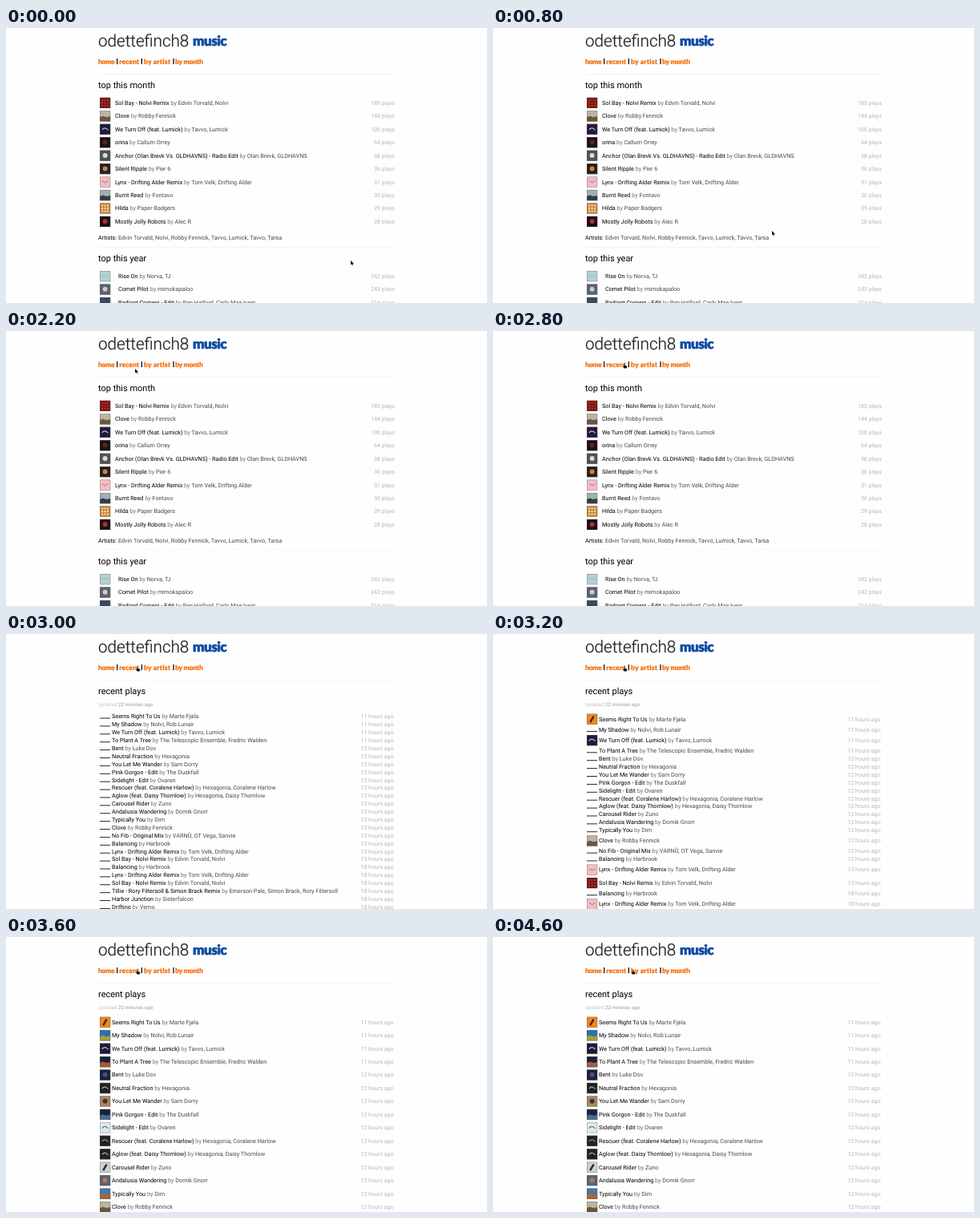
These frames come from a looping animation (600 px wide and 343 px high, 5 s). An HTML page:

```html
<!DOCTYPE html>
<html lang="en">
<head>
<meta charset="utf-8">
<title>music</title>
<style>
html, body { margin: 0; width: 100%; height: 100%; overflow: hidden; background: #fefefe; }
svg { display: block; width: 600px; height: 343px; }
text { font-family: Roboto, "Open Sans", sans-serif; font-size: 7.25px; fill: #000; white-space: pre; text-rendering: geometricPrecision; }
.name { font-size: 20.6px; font-weight: 300; fill: #222; stroke: #222; stroke-width: .25px; }
.logo, .nav { font-family: Lato, "Open Sans", sans-serif; font-weight: 900; }
.logo { font-size: 17px; letter-spacing: -.5px; fill: #0b4aa2; stroke: #0b4aa2; stroke-width: .6px; }
.nav { font-size: 8.5px; fill: #f5700c; stroke: #f5700c; stroke-width: .2px; }
.head { font-size: 11px; }
.by { fill: #707070; }
.who { fill: #484848; }
.side { font-size: 7.05px; fill: #b6b6b6; text-anchor: end; }
.note { font-size: 6.25px; fill: #c4c4c4; }
.note tspan { font-weight: 500; fill: #b0b0b0; }
</style>
</head>
<body>
<svg id="stage" viewBox="0 0 600 343"></svg>
<script>
const NS = 'http://www.w3.org/2000/svg';
const stage = document.getElementById('stage');

function add(parent, tag, attrs = {}, text) {
  const el = document.createElementNS(NS, tag);
  for (const k in attrs) el.setAttribute(k, attrs[k]);
  if (text !== undefined) el.textContent = text;
  parent.appendChild(el);
  return el;
}
const label = (parent, cls, x, y, text) => add(parent, 'text', { class: cls, x, y }, text);
const rule = y => ({ x: 115, y, width: 371, height: 1, fill: '#f4f4f4' });

// key: [title, artists, cover kind, cover back, cover front]
const songs = {
  bay: ['Sol Bay - Nolvi Remix', 'Edvin Torvald, Nolvi', 'grid', '#741313', '#a93225'],
  clove: ['Clove', 'Robby Fennick', 'land', '#b9b5a2', '#6b563d'],
  turn: ['We Turn Off (feat. Lumick)', 'Tavvo, Lumick', 'arc', '#211a3d', '#c5b9d6'],
  orina: ['orina', 'Callum Orrey', 'dot', '#1b1114', '#54242a'],
  anchor: ['Anchor (Olan Brevk Vs. GLDHAVNS) - Radio Edit', 'Olan Brevk, GLDHAVNS', 'dot', '#4e5357', '#d9dcdc'],
  ripple: ['Silent Ripple', 'Pier 6', 'dot', '#2a1e1b', '#c08450'],
  lynx: ['Lynx - Drifting Alder Remix', 'Tom Velk, Drifting Alder', 'vee', '#f0bfc5', '#c4505c'],
  reed: ['Burnt Reed', 'Fontavo', 'land', '#a4aeb6', '#363c44'],
  hilda: ['Hilda', 'Paper Badgers', 'grid', '#c8843c', '#f1d8a6'],
  robots: ['Mostly Jolly Robots', 'Alec R', 'dot', '#1c0d18', '#a83426'],
  rise: ['Rise On', 'Norva, TJ', 'arc', '#b4d2d6', '#9bbcc2'],
  comet: ['Comet Pilot', 'mimokapaloo', 'dot', '#5a6470', '#d4c8c0'],
  corners: ['Radiant Corners - Edit', 'Ben Halford, Carly Mae Ivers', 'land', '#3a4a5c', '#20242c'],
  seems: ['Seems Right To Us', 'Marte Fjøla', 'slash', '#ea8a1e', '#4a2412'],
  shadow: ['My Shadow', 'Nolvi, Rob Lunair', 'land', '#2a70ac', '#a9a03c'],
  plant: ['To Plant A Tree', 'The Telescopic Ensemble, Fredric Walden', 'land', '#1a2238', '#a85c38'],
  bent: ['Bent', 'Luke Dov', 'dot', '#1a2036', '#46507c'],
  neutral: ['Neutral Fraction', 'Hexagonia', 'arc', '#202224', '#a0a4a4'],
  wander: ['You Let Me Wander', 'Sam Dorry', 'dot', '#a98664', '#4a3426'],
  gorgon: ['Pink Gorgon - Edit', 'The Duskfall', 'land', '#16243c', '#4c6c8c'],
  side: ['Sidelight - Edit', 'Ovaren', 'arc', '#e1e8ec', '#4c7ca0'],
  rescue: ['Rescuer (feat. Coralene Harlow)', 'Hexagonia, Coralene Harlow', 'arc', '#202224', '#8c9290'],
  aglow: ['Aglow (feat. Daisy Thornlow)', 'Hexagonia, Daisy Thornlow', 'arc', '#202224', '#a0a4a4'],
  rider: ['Carousel Rider', 'Zuno', 'slash', '#cdd0d2', '#26282c'],
  south: ['Andalusia Wandering', 'Domik Gnorr', 'dot', '#5c6274', '#b8784c'],
  typical: ['Typically You', 'Dim', 'land', '#4878a8', '#b06438'],
  fib: ['No Fib - Original Mix', 'VARNŪ, OT Vega, Sanvie', 'dot', '#30343c', '#90949c'],
  balance: ['Balancing', 'Harbrook', 'land', '#8ca0ac', '#4a5860'],
  marlee: ['Tillie - Rory Filtersoll & Simon Brack Remix', 'Emerson Pale, Simon Brack, Rory Filtersoll', 'land', '#94a4a8', '#3c4848'],
  harbor: ['Harbor Junction', 'Sisterfalcon', 'land', '#d88c6c', '#4c3c58'],
  drift: ['Drifting', 'Vemo', 'dot', '#405468', '#a0b4c0']
};

// Cover centred on y = 0
function cover(parent, [, , kind, back, front]) {
  const g = add(parent, 'g', { transform: 'translate(117 -6.6)' });
  add(g, 'rect', { width: 13.2, height: 13.2, fill: back });
  const line = (d, width = 1.3) => add(g, 'path', { d, fill: 'none', stroke: front, 'stroke-width': width });
  if (kind === 'dot') add(g, 'circle', { cx: 6.6, cy: 6.4, r: 3, fill: front });
  if (kind === 'land') add(g, 'path', { d: 'M0 8L4 6.5L8 8L13.2 7V13.2H0Z', fill: front });
  if (kind === 'arc') line('M2.8 7.2Q6.5 2.8 10.4 7.6');
  if (kind === 'vee') line('M3 5L6.6 7.4L10.2 5', .9);
  if (kind === 'slash') line('M4.2 10.5L6.5 6.5L8.6 3', 2.4);
  if (kind === 'grid') {
    for (let i = 0; i < 9; i++)
      add(g, 'rect', { x: 2 + i % 3 * 3.5, y: 2 + Math.floor(i / 3) * 3.5, width: 2.2, height: 2.2, fill: front });
  }
  add(g, 'rect', { x: .3, y: .3, width: 12.6, height: 12.6, fill: 'none', stroke: '#555', 'stroke-opacity': .55, 'stroke-width': .6 });
  return g;
}

function row(parent, key, x, y, side, sideX) {
  const song = songs[key];
  const g = add(parent, 'g', { transform: `translate(0 ${y})` });
  const art = cover(g, song);
  const line = label(g, '', x, 2.4);
  add(line, 'tspan', {}, song[0]);
  add(line, 'tspan', { class: 'by' }, ' by ');
  add(line, 'tspan', { class: 'who' }, song[1]);
  label(g, 'side', sideX, 2.4, side);
  return { g, art };
}

// Header
label(stage, 'name', 115, 22.6, 'odettefinch8');
label(stage, 'logo', 233, 22.3, 'music');
[['home', 115, -.35], ['recent', 141.2, .1], ['by artist', 172, .2], ['by month', 211, -.2]].forEach(([word, x, gap]) =>
  add(stage, 'text', { class: 'nav', x, y: 45, 'letter-spacing': gap }, word));
[138, 168.7, 208.3].forEach(x => add(stage, 'rect', { x, y: 38, width: 1.3, height: 7.2, fill: '#111' }));
add(stage, 'rect', rule(57));

// Charts page
const charts = add(stage, 'g');
label(charts, 'head', 115, 74.7, 'top this month');
const month = { bay: 185, clove: 144, turn: 100, orina: 64, anchor: 58, ripple: 36, lynx: 31, reed: 30, hilda: 29, robots: 28 };
Object.keys(month).forEach((key, i) => row(charts, key, 136, 93.4 + i * 16.45, month[key] + ' plays', 485));
const artists = label(charts, '', 115, 263.8, 'Artists: ');
add(artists, 'tspan', { class: 'who' }, 'Edvin Torvald, Nolvi, Robby Fennick, Tavvo, Lumick, Tavvo, Tarsa');
add(charts, 'rect', rule(273));
label(charts, 'head', 115, 290.8, 'top this year');
const year = { rise: 342, comet: 243, corners: 214 };
Object.keys(year).forEach((key, i) => row(charts, key, 140, 309.6 + i * 16.45, year[key] + ' plays', 485));

// Recent page
const recent = add(stage, 'g');
label(recent, 'head', 115, 74.7, 'recent plays');
add(label(recent, 'note', 115, 90.4, 'Updated '), 'tspan', {}, '22 minutes ago');
const order = ('seems shadow turn plant bent neutral wander gorgon side rescue aglow rider south ' +
  'typical clove fib balance lynx bay balance lynx bay marlee harbor drift').split(' ');
const plays = order.map((key, i) => {
  const hours = i < 4 ? 11 : i < 17 ? 12 : i < 19 ? 13 : 18;
  const item = row(recent, key, 132, 0, hours + ' hours ago', 483.5);
  item.dash = add(item.g, 'rect', { x: 117, y: 1.6, width: 13, height: .9, fill: '#111' });
  return item;
});
const cached = ['seems', 'turn', 'clove', 'lynx', 'bay'];

// Rows grow once their cover has loaded
function layout(t) {
  let y = 98.05;
  plays.forEach((item, i) => {
    const ready = t >= 3600 || t >= 3400 && i < 9 || t >= 3200 && cached.includes(order[i]);
    const h = ready ? 16.45 : 9.89;
    item.g.setAttribute('transform', `translate(0 ${y + h / 2})`);
    item.art.style.display = ready ? '' : 'none';
    item.dash.style.display = ready ? 'none' : '';
    y += h;
  });
}

// Pointer
const ink = { fill: '#111', stroke: '#fff', 'stroke-width': .5, 'paint-order': 'stroke' };
const arrow = add(stage, 'path', { d: 'M0 0V5.4L1.3 4.3L2.2 6.2L3.1 5.8L2.3 4H4Z', ...ink });
const hand = add(stage, 'path', { d: 'M1.2 .4Q2 0 2.2 .8V2.6L4.6 3.2Q5.4 3.5 5.2 4.5L4.6 6.2H1.6L0 4.2Q.2 3.4 1.2 4Z', ...ink });
// [time, x, y, over a link]
const stops = [
  [0, 430, 290], [400, 385, 258], [600, 366, 258], [800, 348, 253], [1000, 275, 103],
  [1200, 193, 59], [1400, 178, 39, 1], [1600, 157.5, 38.3, 1], [1800, 162, 40.4, 1],
  [2200, 161, 47], [2600, 162, 40.2, 1], [4200, 168, 41], [4400, 179, 40, 1], [4600, 172.3, 40.4, 1]
];

function draw(t) {
  charts.style.display = t < 3000 ? '' : 'none';
  recent.style.display = t < 3000 ? 'none' : '';
  if (t >= 3000) layout(t);
  const [, x, y, link] = stops.filter(s => s[0] <= t).pop();
  arrow.style.display = link ? 'none' : '';
  hand.style.display = link ? '' : 'none';
  (link ? hand : arrow).setAttribute('transform', `translate(${x} ${y})`);
}

function tick() {
  draw(performance.now() % 5000);
  requestAnimationFrame(tick);
}
tick();
</script>
</body>
</html>
```
